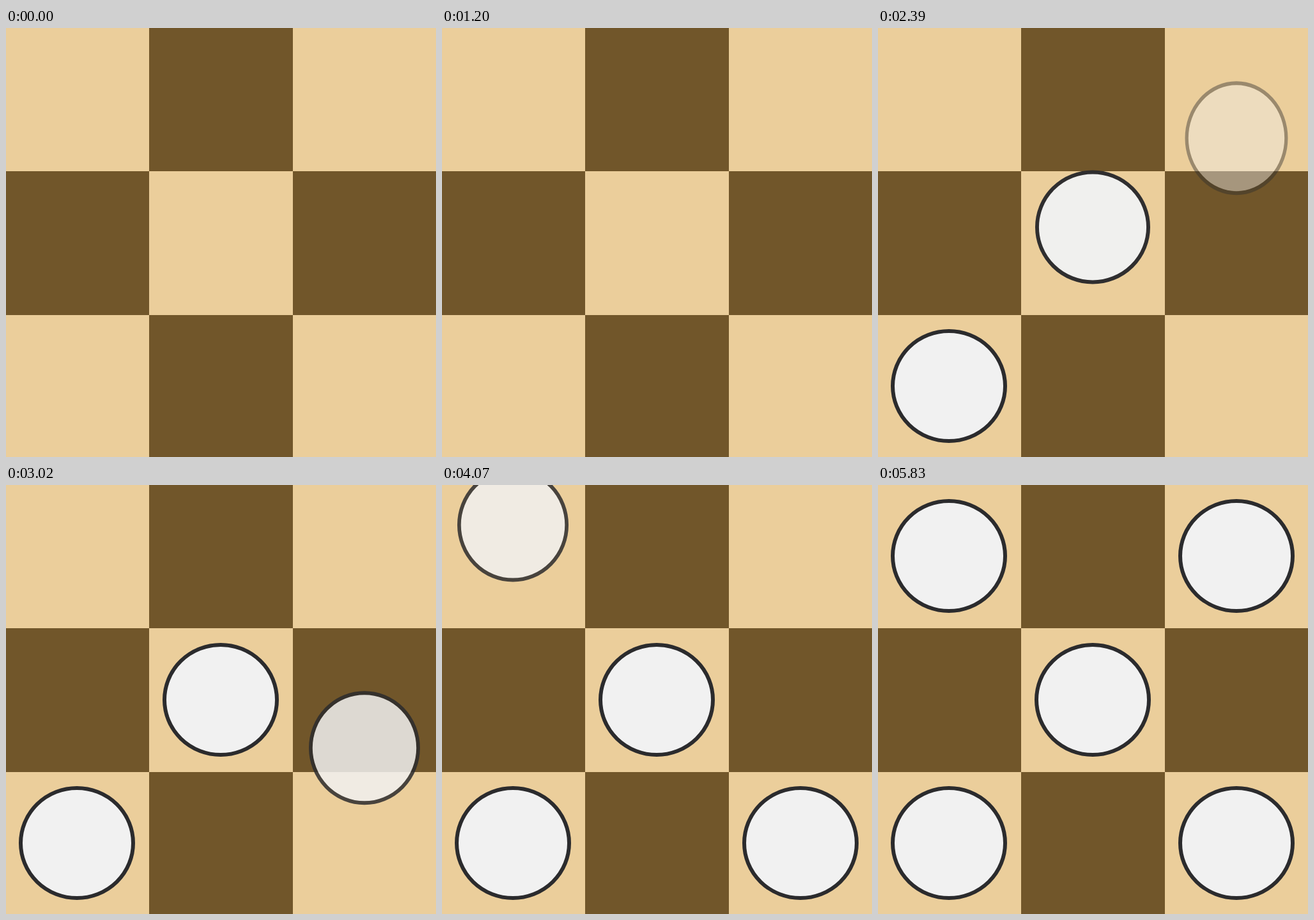
An HTML page that plays this animation: 673x671 px, repeating every 6.09 s.

```html
<!DOCTYPE html>
<html lang="en">
<head>
<meta charset="utf-8">
<title>Falling discs</title>
<style>
  html, body { margin: 0; width: 100%; height: 100%; overflow: hidden; background: #ebce9b; }
  svg { display: block; width: 673px; height: 671px; }
</style>
</head>
<body>
<svg viewBox="0 0 673 671">
  <rect width="673" height="671" fill="#ebce9b"/>
  <path fill="#71562a" shape-rendering="crispEdges"
    d="M224 0h225v224h-225zM0 224h224v225h-224zM449 224h224v225h-224zM224 449h225v222h-225z"/>
  <g id="discs" fill="#f1f1f1" stroke="#2b2b2d" stroke-width="6"></g>
</svg>
<script>
const LOOP = 6090;
const STEP = 70;
const FALL = 1700;     // duration of one fall
const STAGGER = 1043;  // delay between falls
const LEAD = 98;       // the first fall is already under way at time zero
const START_Y = -112;
const LANDED = 5830;

const spots = [[111, 560], [336, 336], [561, 560], [111, 111], [561, 111]];
const layer = document.getElementById('discs');

const discs = spots.map(([x, y], i) => {
  const node = document.createElementNS('http://www.w3.org/2000/svg', 'ellipse');
  node.setAttribute('rx', 88);
  node.setAttribute('ry', 86);
  layer.append(node);
  return { node, x, y, start: i * STAGGER - LEAD };
});

// Remaining share of the fall: a drop followed by three ever lower bounces.
function bounceLeft(p) {
  const k = 7.5625, n = 2.75;
  if (p < 1 / n) return 1 - k * p * p;
  if (p < 2 / n) return 0.25 - k * (p - 1.5 / n) ** 2;
  if (p < 2.5 / n) return 0.0625 - k * (p - 2.25 / n) ** 2;
  return 0.015625 - k * (p - 2.625 / n) ** 2;
}

// The picture advances in steps, with two slightly longer ones.
function stepTime(t) {
  if (t >= LANDED) return LANDED;
  if (t < 1270) return Math.min(Math.floor(t / STEP) * STEP, 1260);
  return Math.min(10 + Math.floor((t - 10) / STEP) * STEP, 5750);
}

function draw(t) {
  for (const { node, x, y, start } of discs) {
    const p = Math.min(1, Math.max(0, (t - start) / FALL));
    const left = bounceLeft(p);
    const cy = y + (START_Y - y) * left;
    node.setAttribute('transform', `translate(${x} ${cy}) scale(${1 - 0.2 * left} 1)`);
    node.setAttribute('opacity', 1 - (1 - p) ** 2);
  }
}

const origin = performance.now();
function tick() {
  draw(stepTime((performance.now() - origin) % LOOP));
  requestAnimationFrame(tick);
}
tick();
</script>
</body>
</html>
```
